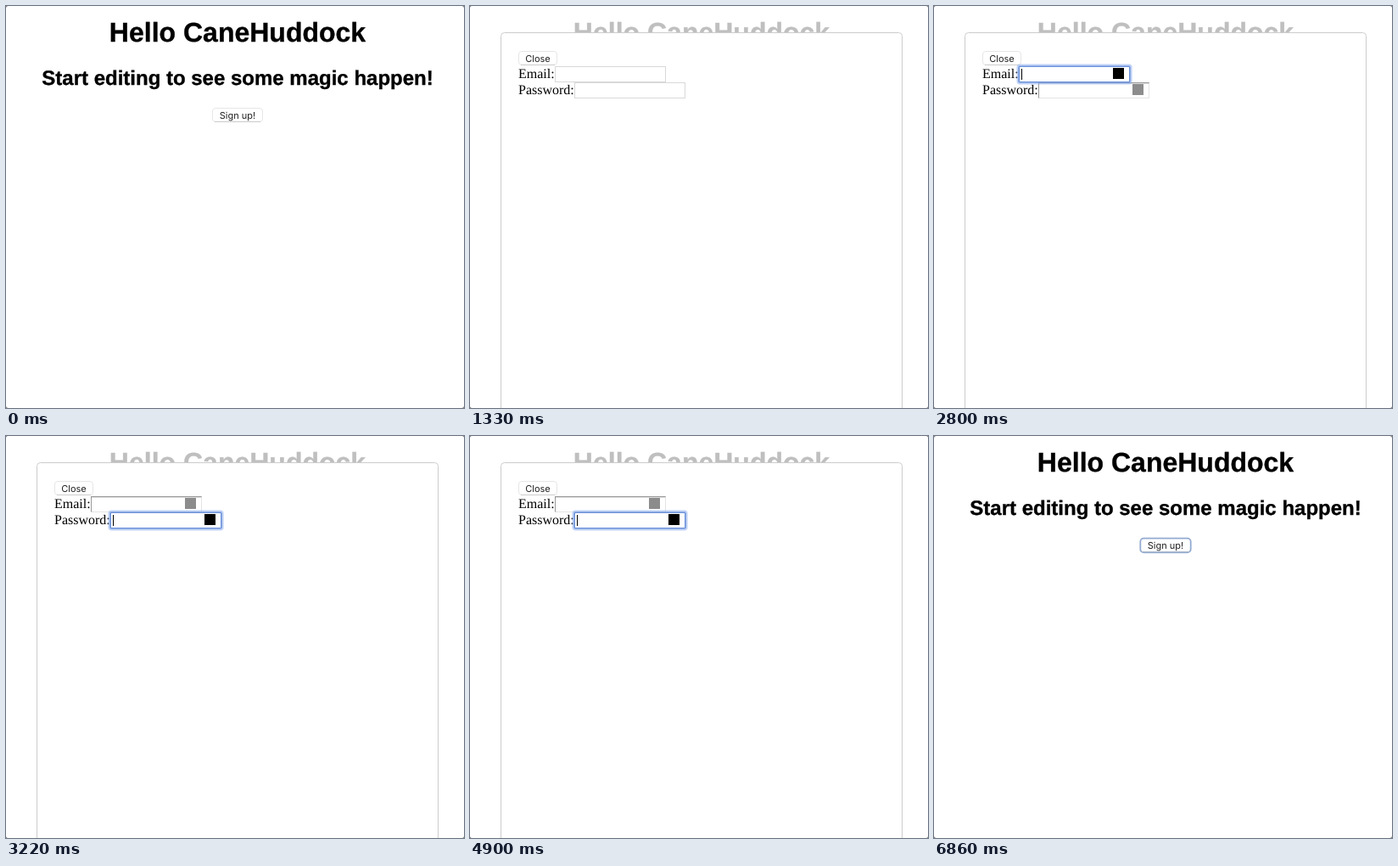
An HTML page for the animation above (7000 ms loop, 540 by 474 pixels).

```html
<!DOCTYPE html>
<html lang="en">
<head>
<meta charset="utf-8">
<title>Sign-up dialog</title>
<style>
  html, body { margin: 0; height: 100%; overflow: hidden; background: #fff; }
  svg { display: block; width: 100vw; height: 100vh; }
  text { font-kerning: none; text-rendering: geometricPrecision; }

  .head { font: bold 32px "Liberation Sans", Arial, sans-serif; text-anchor: middle; stroke: #000; stroke-width: .35; }
  .sub { font-size: 24px; }
  .label { font: 16px "Liberation Serif", Times, serif; }
  .btn { font: 11px Inter, sans-serif; text-anchor: middle; fill: #222; }
  .face { fill: #fff; stroke: #e6e6e6; }
  .edge { fill: none; stroke: #cbcbcb; }
  .ring { fill: none; stroke: #93abd0; stroke-width: 1.8; }
  .glow { fill: none; stroke: #8fb0ee; stroke-width: 3.6; stroke-opacity: .55; }
  .core { fill: #fff; stroke: #6c92da; stroke-width: 1.6; }

  /* Every part switches hard on one shared 7 s clock. */
  .t { opacity: 0; animation: 7s step-end infinite; }
  .modal { animation-name: modal; }
  .sign { animation-name: sign; }
  .active { animation-name: active; }
  .close { animation-name: close; }
  .email { animation-name: email; }
  .pass { animation-name: pass; }
  .blink { animation-name: blink; }

  @keyframes modal { 0%, 98%, 100% { opacity: 0 } 19% { opacity: 1 } }
  @keyframes sign { 0% { opacity: 0 } 7%, 100% { opacity: 1 } }
  @keyframes active { 0% { opacity: 0 } 32%, 100% { opacity: 1 } }
  @keyframes close { 0%, 40%, 63%, 100% { opacity: 0 } 33%, 56% { opacity: 1 } }
  @keyframes email { 0%, 46%, 70%, 100% { opacity: 0 } 40%, 63% { opacity: 1 } }
  @keyframes pass { 0%, 56%, 98%, 100% { opacity: 0 } 46%, 70% { opacity: 1 } }
  @keyframes blink { 0%, 70%, 85% { opacity: 1 } 54%, 77%, 92%, 100% { opacity: 0 } }
</style>
</head>
<body>
<svg viewBox="0 0 540 474">
  <defs>
    <rect id="window" width="540" height="474" rx="3" fill="#fff"/>
    <rect id="icon" x="111" y="2" width="13" height="13"/>
    <rect id="caret" x="3" y="3" width="1" height="13"/>
    <rect id="idle" x=".5" y=".5" width="130" height="18" fill="#fff" stroke="#d8d8d8"/>
    <g id="inset">
      <path d="M0 0H131V19H0Z" fill="#e4e4e4"/>
      <path d="M0 0H131L130 1.5H1V18L0 19Z" fill="#989898"/>
      <path d="M1 1.5H130V18H1Z" fill="#fff"/>
      <use href="#icon" fill="#8c8c8c"/>
    </g>
    <g id="focus">
      <rect class="glow" x="-.8" y="-.8" width="132.6" height="20.6" rx="2"/>
      <rect class="core" x=".2" y=".2" width="130.6" height="18.6" rx="1"/>
      <use href="#icon"/>
    </g>
  </defs>

  <rect width="540" height="474" fill="#777"/>
  <use href="#window"/>
  <text class="head" x="273" y="42">Hello CaneHuddock</text>
  <text class="head sub" x="273" y="93">Start editing to see some magic happen!</text>
  <g transform="translate(243 120)">
    <rect class="face" x=".5" y=".5" width="59" height="16" rx="3.5"/>
    <path class="edge" d="M3 16.5H57"/>
    <rect class="ring t sign" x=".3" y=".6" width="59.4" height="16.8" rx="4"/>
    <text class="btn" x="30" y="13">Sign up!</text>
  </g>

  <g class="t modal">
    <use href="#window" opacity=".75"/>
    <rect x="36.5" y="31.5" width="473" height="480" rx="4" fill="#fff" stroke="#ccc"/>
    <g transform="translate(57 53)">
      <rect class="face" x=".5" y=".5" width="45" height="16" rx="3.5"/>
      <path class="edge" d="M3 16.5H43"/>
      <rect class="ring t close" x=".3" y=".6" width="45.4" height="16.8" rx="4"/>
      <text class="btn" x="23" y="13">Close</text>
    </g>
    <text class="label" x="57" y="85">Email:</text>
    <text class="label" x="57" y="104">Password:</text>
    <g transform="translate(100 71)">
      <use href="#idle"/>
      <use class="t active" href="#inset"/>
    </g>
    <g transform="translate(123 90)">
      <use href="#idle"/>
      <use class="t active" href="#inset"/>
    </g>
    <g transform="translate(100 71)">
      <g class="t email">
        <use href="#focus"/>
        <use href="#caret"/>
      </g>
    </g>
    <g transform="translate(123 90)">
      <g class="t pass">
        <use href="#focus"/>
        <use class="t blink" href="#caret"/>
      </g>
    </g>
  </g>
</svg>
</body>
</html>
```
